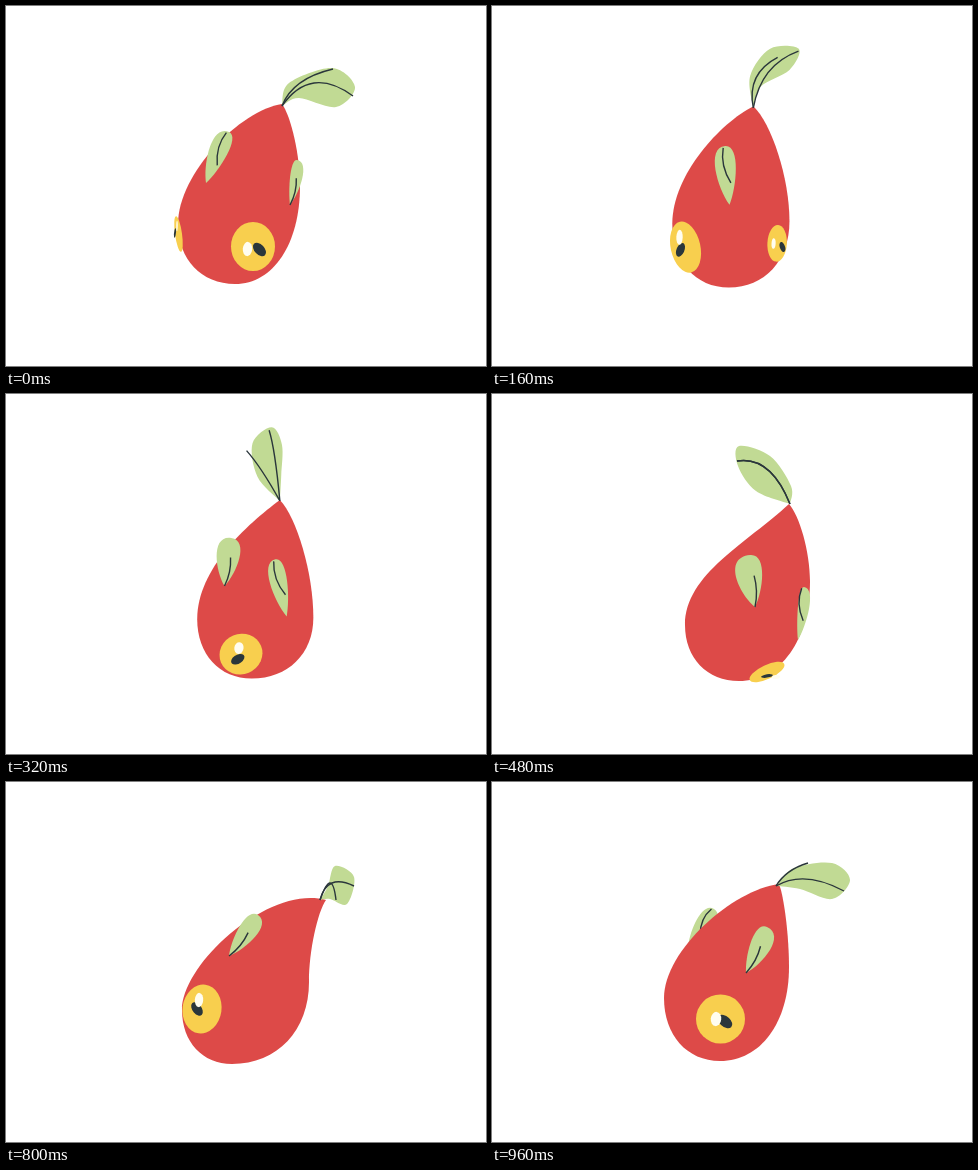
Write an HTML page with a canvas that moves like this. It is 480 px wide and 360 px high and loops after 1.04 s.

```html
<!DOCTYPE html>
<html lang="en">
<head>
<meta charset="utf-8">
<title>Fruit fish</title>
<style>
html, body { margin: 0; width: 100%; height: 100%; overflow: hidden; background: #fff; }
canvas { display: block; }
</style>
</head>
<body>
<canvas id="stage" width="480" height="360"></canvas>
<script>
const LOOP = 1040;
const RED = '#dd4a48', LEAF = '#c1da94', YELLOW = '#f8cf4e', DARK = '#2a363b';
const ctx = document.getElementById('stage').getContext('2d');

// Every key is [time, ...values].
// Body: tip, left, bottom and right extremes, slope at the tip.
const body = [
  [0, 276,98, 172,218, 229,278, 294,180, .05],
  [80, 263,97, 172,215, 230,280, 294,190, .15],
  [240, 265,104, 188,222, 243,283, 302,232, .13],
  [480, 297,110, 193,231, 247,287, 318,187, .32],
  [640, 319,118, 187,236, 241,287, 323,150, -.12],
  [800, 320,118, 176,228, 226,282, 303,200, -.14],
  [960, 287,102, 172,216, 228,279, 297,185, .05]
];

// Tail leaf: outline points from its base.
const tail = [
  [0, 276,100, 283,77, 326,62, 349,81, 330,101, 293,92],
  [80, 263,99, 270,67, 306,50, 333,63, 317,83, 276,86],
  [240, 265,105, 251,76, 256,41, 283,30, 282,51, 268,78],
  [480, 298,110, 264,97, 246,72, 247,52, 278,62, 299,92],
  [640, 328,114, 304,108, 291,80, 288,64, 316,72, 332,98],
  [800, 314,118, 322,104, 329,84, 348,95, 341,122, 324,117],
  [960, 284,104, 302,86, 340,81, 358,98, 340,117, 308,107]
];

// Two veins from the base of the tail: middle and end of each.
const veins = [
  [0, 294,77, 327,63, 308,77, 347,90],
  [80, 280,67, 325,53, 287,73, 333,69],
  [240, 254,78, 251,53, 271,62, 282,31],
  [480, 275,75, 245,67, 275,75, 245,67],
  [640, 317,89, 291,81, 321,114, 315,119],
  [800, 324,101, 330,118, 326,101, 348,104],
  [960, 297,90, 316,81, 315,97, 352,109]
];

// Fins: stem, round end, left and right width.
// They lie over the body between the times in front; vein is where the vein starts.
const fins = [
  { front: [800, 1120], vein: 0, keys: [
    [720, 207,168, 232,135, 8, 9],
    [800, 223,174, 252,133, 9, 11],
    [960, 254,191, 275,145, 9, 13],
    [1040, 284,199, 291,154, 4.5, 8.5],
    [1120, 293,203, 297,161, 5, 7]] },
  { front: [1040, 1600], vein: .37, keys: [
    [960, 196,166, 222,127, 9, 10],
    [1040, 200,177, 223,126, 12, 8],
    [1120, 210,188, 222,130, 10.5, 11],
    [1280, 264,210, 249,152, 13, 8],
    [1520, 306,246, 312,193, 4, 8],
    [1600, 313,245, 319,205, 4, 6]] },
  { front: [320, 720], vein: 0, keys: [
    [240, 196,182, 210,137, 10, 12],
    [480, 263,213, 258,161, 17, 11],
    [640, 304,240, 310,200, 12, 9.5],
    [720, 305,240, 312,200, 5, 6]] }
];

// Eyes: iris as x, y, rx, ry, degrees; then pupil and highlight centres.
const eyes = [
  { tilt: 45, keys: [
    [720, 178,222, 5,19, 8, 175,226, 176,216],
    [800, 196,227, 19.5,24.5, 8, 191,227, 193,218],
    [960, 228.5,237, 24.5,24.5, 0, 233,239.5, 224,237],
    [1040, 247,240.5, 22,24.5, 0, 253.5,243.5, 241.5,243],
    [1120, 268,239.5, 17,23, 5, 277,245, 262,240],
    [1280, 301.5,235, 2,13, 0, 302,236, 301,235]] },
  { tilt: -40, keys: [
    [0, 172.5,228, 3.5,18, -8, 169,227, 171,220],
    [80, 175,232, 7,24, -5, 170,232, 171,224],
    [240, 215,251, 21,25, -20, 210.5,256, 209,241],
    [480, 275,278, 19,7, -25, 275,282, 284,283]] }
];

// Smooth interpolation between keys; null outside an open track.
function sample(keys, t, loop) {
  const n = keys.length;
  if (!loop && (t < keys[0][0] || t > keys[n - 1][0])) return null;
  const at = i => {
    if (!loop) return keys[Math.max(0, Math.min(n - 1, i))];
    const [time, ...rest] = keys[(i + n) % n];
    return [time + Math.floor(i / n) * LOOP, ...rest];
  };
  let i = 0;
  while (i < n - 1 && keys[i + 1][0] <= t) i++;
  const [a, b, c, d] = [at(i - 1), at(i), at(i + 1), at(i + 2)];
  const h = c[0] - b[0];
  if (!h) return b.slice(1);
  const s = (t - b[0]) / h, s2 = s * s, s3 = s2 * s;
  return b.map((v, j) => {
    const m0 = (c[j] - a[j]) / (c[0] - a[0]) * h;
    const m1 = (d[j] - b[j]) / (d[0] - b[0]) * h;
    return (2 * s3 - 3 * s2 + 1) * v + (s3 - 2 * s2 + s) * m0
      + (3 * s2 - 2 * s3) * c[j] + (s3 - s2) * m1;
  }).slice(1);
}

function fill(color) {
  ctx.fillStyle = color;
  ctx.fill();
}

function drawBody([tx, ty, lx, ly, bx, by, rx, ry, slope]) {
  const k = .59, left = ly - ty, right = ry - ty;
  ctx.beginPath();
  ctx.moveTo(tx, ty);
  ctx.bezierCurveTo(tx + (lx - tx) * .4, ty + left * slope, lx, ly - left * .42, lx, ly);
  ctx.bezierCurveTo(lx, ly + (by - ly) * k, bx + (lx - bx) * k, by, bx, by);
  ctx.bezierCurveTo(bx + (rx - bx) * k, by, rx, ry + (by - ry) * k, rx, ry);
  ctx.bezierCurveTo(rx, ry - right * .38, (rx + tx) / 2, ty + right * .15, tx, ty);
  fill(RED);
}

// Line that bends through its middle point.
function vein(x0, y0, x1, y1, x2, y2) {
  ctx.beginPath();
  ctx.moveTo(x0, y0);
  ctx.quadraticCurveTo(2 * x1 - (x0 + x2) / 2, 2 * y1 - (y0 + y2) / 2, x2, y2);
  ctx.stroke();
}

// Closed curve that is smooth everywhere except at its base.
function drawTail(v, lines) {
  const pts = [];
  for (let i = 0; i < v.length; i += 2) pts.push([v[i], v[i + 1]]);
  pts.push(pts[0]);
  const at = i => pts[Math.max(0, Math.min(pts.length - 1, i))];
  ctx.beginPath();
  ctx.moveTo(...pts[0]);
  for (let i = 0; i < pts.length - 1; i++) {
    const [a, b, c, d] = [at(i - 1), at(i), at(i + 1), at(i + 2)];
    ctx.bezierCurveTo(b[0] + (c[0] - a[0]) / 6, b[1] + (c[1] - a[1]) / 6,
      c[0] - (d[0] - b[0]) / 6, c[1] - (d[1] - b[1]) / 6, c[0], c[1]);
  }
  fill(LEAF);
  vein(...pts[0], ...lines.slice(0, 4));
  vein(...pts[0], ...lines.slice(4));
}

function drawFin([x, y, ex, ey, left, right], from) {
  const len = Math.hypot(ex - x, ey - y);
  ctx.save();
  ctx.translate(x, y);
  ctx.rotate(Math.atan2(ey - y, ex - x));
  ctx.beginPath();
  ctx.moveTo(0, 0);
  ctx.bezierCurveTo(len * .3, -left * .9, len, -left * 1.6, len, 0);
  ctx.bezierCurveTo(len, right * 1.6, len * .3, right * .9, 0, 0);
  fill(LEAF);
  const bow = from ? -3 : 3;
  vein(len * from, from ? 3 : 0, len * (from + .3), bow, len * (from + .6), bow * .7);
  ctx.restore();
}

function drawFins(t, inFront) {
  for (const { front, vein, keys } of fins)
    for (const time of [t, t + LOOP]) {
      const v = sample(keys, time);
      if (v && (time >= front[0] && time < front[1]) === inFront) drawFin(v, vein);
    }
}

// Pupil and highlight flatten together with the iris.
function drawEye([x, y, rx, ry, deg, px, py, hx, hy], tilt) {
  rx = Math.max(0, rx);
  ry = Math.max(0, ry);
  const oval = (cx, cy, sx, sy, a, b, angle, color) => {
    ctx.save();
    ctx.translate(cx, cy);
    ctx.scale(sx, sy);
    ctx.beginPath();
    ctx.ellipse(0, 0, a, b, angle * Math.PI / 180, 0, 2 * Math.PI);
    ctx.restore();
    fill(color);
  };
  oval(x, y, 1, 1, rx, ry, deg, YELLOW);
  oval(px, py, rx / 22, ry / 24, 7.8, 5, tilt, DARK);
  oval(hx, hy, rx / 22, ry / 24, 4.7, 7, 5, '#fffdf0');
}

function draw(t) {
  ctx.fillStyle = '#fff';
  ctx.fillRect(0, 0, 480, 360);
  ctx.strokeStyle = DARK;
  ctx.lineWidth = 1.4;
  drawFins(t, false);
  drawBody(sample(body, t, true));
  drawTail(sample(tail, t, true), sample(veins, t, true));
  drawFins(t, true);
  for (const { tilt, keys } of eyes)
    for (const time of [t, t + LOOP]) {
      const v = sample(keys, time);
      if (v) drawEye(v, tilt);
    }
}

// Poses are held for 80 ms; the first 80 ms hold two of 40 ms.
let start;
function tick(now) {
  start ??= now;
  const ms = (now - start) % LOOP;
  const step = ms < 80 ? 40 : 80;
  draw(Math.floor(ms / step) * step);
  requestAnimationFrame(tick);
}
draw(0);
requestAnimationFrame(tick);
</script>
</body>
</html>
```
